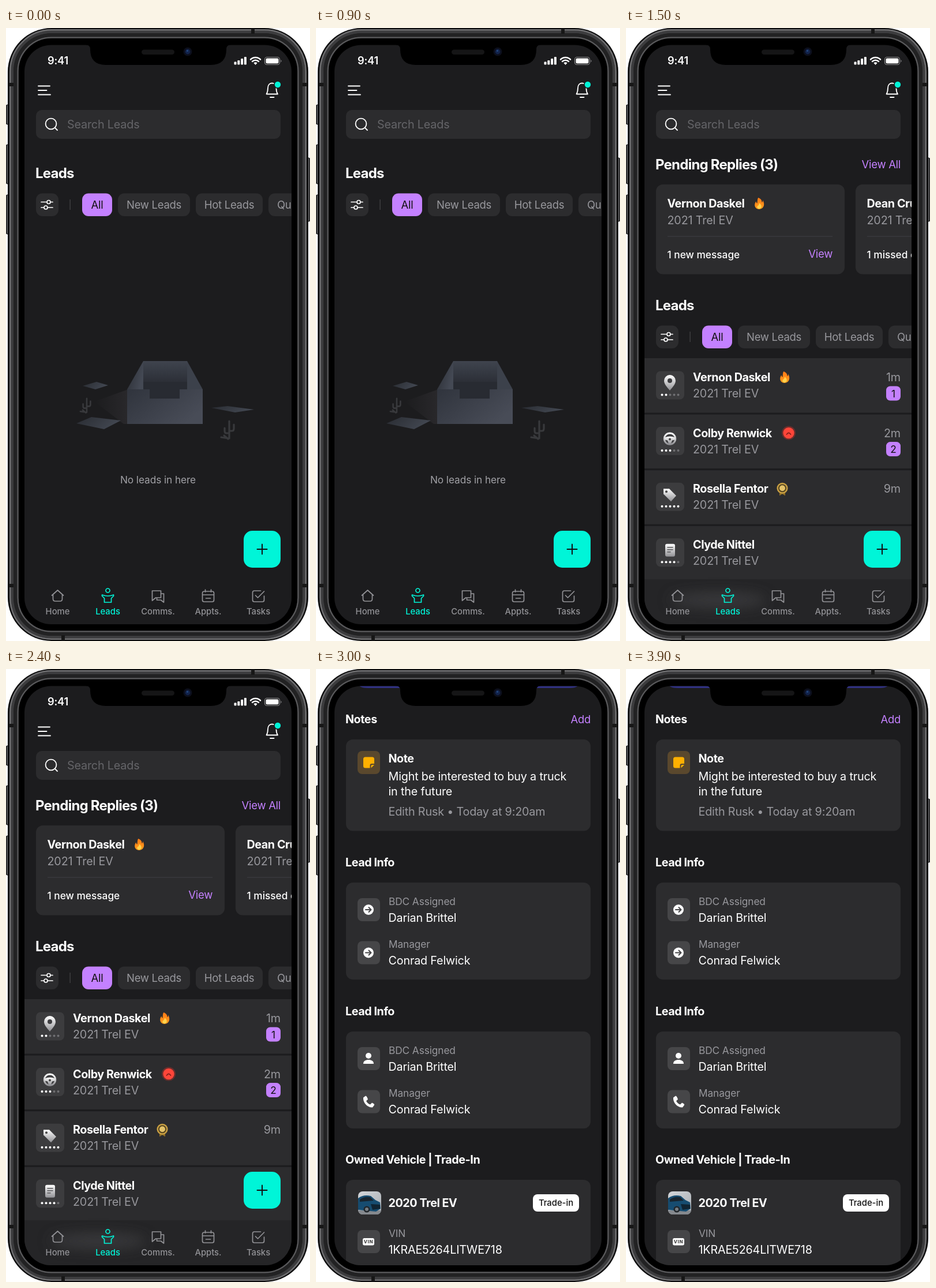
Write an HTML page that moves like this. It is 527 by 1062 pixels and loops after 4500 ms.

```html
<!DOCTYPE html>
<html lang="en">
<head>
<meta charset="utf-8">
<title>Leads app</title>
<style>
  html, body { margin: 0; width: 100%; height: 100%; overflow: hidden; background: #fff; }
  svg { display: block; width: 100%; height: 100%; }
  text { font-family: Inter, sans-serif; font-optical-sizing: none; fill: #fff; white-space: pre; }
  .body { font-size: 19.76px; letter-spacing: -.009em; }
  .bold { font-size: 19.76px; letter-spacing: -.023em; font-weight: 700; }
  .head { font-size: 24px; letter-spacing: -.032em; font-weight: 700; }
  .chip { font-size: 18.5px; letter-spacing: -.016em; }
  .small { font-size: 17.3px; letter-spacing: -.006em; }
  .status { font-size: 17.3px; font-weight: 500; }
  .clock { font-size: 18.3px; font-weight: 600; letter-spacing: -.011em; }
  .tab { font-size: 14.8px; font-weight: 500; }
  .line { fill: none; stroke-linecap: round; stroke-linejoin: round; }
</style>
</head>
<body>
<script>
const TEAL = '#00f5d8', PURPLE = '#c481ff', BG = '#1c1c1e', CARD = '#2c2c2e', BOX = '#464648', GRAY = '#98989d';
const SCENE_MS = 1500;

const rect = (x, y, w, h, r, fill, extra = '') =>
  `<rect x="${x}" y="${y}" width="${w}" height="${h}" rx="${r}" fill="${fill}" ${extra}/>`;
const circle = (x, y, r, fill, extra = '') => `<circle cx="${x}" cy="${y}" r="${r}" fill="${fill}" ${extra}/>`;
const path = (d, fill, extra = '') => `<path d="${d}" fill="${fill}" ${extra}/>`;
const line = (d, color = '#fff', width = 1.8) => `<path class="line" d="${d}" stroke="${color}" stroke-width="${width}"/>`;
const text = (x, y, kind, str, color = '#fff', anchor = 'start') =>
  `<text x="${x}" y="${y}" class="${kind}" text-anchor="${anchor}" style="fill:${color}">${str}</text>`;
const at = (x, y, content, scale = 1) => `<g transform="translate(${x} ${y}) scale(${scale})">${content}</g>`;
const gradient = (id, from, to, x2 = 0, y2 = 1) =>
  `<linearGradient id="${id}" x2="${x2}" y2="${y2}"><stop stop-color="${from}"/><stop offset="1" stop-color="${to}"/></linearGradient>`;

const defs = `<defs>
  ${gradient('front', '#30343d', '#484c57', 1, .6)}${gradient('back', '#3f444e', '#2c2f37')}
  ${gradient('side', '#2a2d34', '#444954', 1, .4)}${gradient('shade', '#1c1c1e', '#29282b', 1, 0)}
  ${gradient('paper', '#292c32', '#424751', 1, .3)}${gradient('metal', '#ffffff', '#909094')}
  ${gradient('fire', '#ff7a16', '#ff9d1c')}${gradient('photo', '#d3d6d9', '#a8adb2', 1, 1)}
  <clipPath id="screen"><rect x="32" y="29.5" width="463" height="1003.5" rx="46"/></clipPath>
  <clipPath id="thumb"><rect x="73" y="905" width="40" height="40" rx="8"/></clipPath>
  <filter id="blur" x="-50%" y="-150%" width="200%" height="400%"><feGaussianBlur stdDeviation="12"/></filter>
</defs>`;

// Phone shell
const ring = (inset, color, width) =>
  rect(4 + inset, inset, 519 - 2 * inset, 1062 - 2 * inset, 75 - inset, 'none', `stroke="${color}" stroke-width="${width}"`);
const button = (x, y, h) => rect(x, y, 6, h, 2, '#5c5c5e', 'stroke="#111" stroke-width="1.2"');
const seam = (x, y, w, h) => rect(x, y, w, h, 0, '#171717');
const shell = button(0.5, 133, 34) + button(0.5, 202, 68) + button(0.5, 289, 68) + button(520.5, 225, 110)
  + rect(3, 0, 521, 1062, 76, '#0b0b0c')
  + ring(3.5, '#6e6e70', 3) + ring(7, '#3c3c3e', 5) + ring(12, '#222223', 6) + ring(16.5, '#58585a', 2.5)
  + rect(22, 18, 483, 1026, 57, '#000')
  + seam(425, 1, 6, 9) + seam(96, 1052, 6, 9) + [95, 963].map(y => seam(4, y, 9, 6) + seam(514, y, 9, 6)).join('');
const notch = path('M138 29q8 0 8 8 0 27 27 27H355q27 0 27-27 0-8 8-8z', '#000')
  + rect(235, 37.5, 57, 8.5, 4.2, '#151516') + circle(315, 41, 7.5, '#0c0f1c')
  + circle(315, 41, 4.4, '#12234c') + circle(314.5, 39.5, 1.5, '#244a80');

// Header
const wifi = line('M424 54.5a12 12 0 0 1 17 0M427 58a8 8 0 0 1 11 0', '#fff', 2.5)
  + path('M432.5 64l-3.1-3.4a4.5 4.5 0 0 1 6.2 0z', '#fff');
const header = text(72, 63, 'clock', '9:41')
  + [5, 7.5, 10.5, 13.5].map((h, i) => rect(395.5 + 5.8 * i, 63.5 - h, 4, h, 1, '#fff')).join('')
  + wifi + rect(448.5, 50.5, 26, 13, 4, 'none', 'stroke="#8a8a8c" stroke-width="1.2"')
  + rect(450.5, 52.5, 22, 9, 2.3, '#fff') + path('M476.5 55q2.5 2 0 4.5z', '#8a8a8c')
  + line('M56 100.5H76M56 108H70.5M56 115.5H77')
  + line('M451.5 114.5H471c-2-3-2.5-5-2.5-10 0-6-3.2-9-7.3-9s-7.3 3-7.3 9c0 5-.5 7-2.4 10zM458 120h6.5')
  + circle(471, 98, 7, BG) + circle(471, 98, 5.2, TEAL)
  + rect(52, 142, 424, 50, 10, CARD) + circle(78, 166, 9.4, 'none', 'stroke="#fff" stroke-width="1.8"')
  + line('M85 173l4 4') + text(106, 173.5, 'body', 'Search Leads', '#656569');

// Filter row, placed relative to the first layout
const chip = (x, w, label, active) => rect(x, 286.5, w, 39.5, 11, active ? PURPLE : CARD)
  + text(x + w / 2, 312.5, 'chip', label, active ? '#111' : GRAY, 'middle');
const filters = text(51, 260, 'head', 'Leads') + rect(52, 286.5, 39, 39.5, 11, CARD)
  + line('M61 301.5H70M78 301.5H81M61 311H65M73 311H81', '#fff', 1.7)
  + [[74, 301.5], [69, 311]].map(([x, y]) => circle(x, y, 3, 'none', 'stroke="#fff" stroke-width="1.7"')).join('')
  + rect(110.5, 297, 1.3, 18, 0, '#424245')
  + chip(132, 52, 'All', true) + chip(194, 125, 'New Leads') + chip(329, 116, 'Hot Leads')
  + rect(455, 286.5, 110, 39.5, 11, CARD) + text(470, 312.5, 'chip', 'Qualified', GRAY);

// Bottom navigation
const tabs = [
  ['Home', 'M-10-1L0-10 10-1M-8-3V5q0 4 4 4H4q4 0 4-4V-3'],
  ['Leads', 'M-3.5-9.5a3.5 3.5 0 1 1 7 0 3.5 3.5 0 1 1-7 0M-10-2Q0 2 10-2V0L6 4V11H-6V4L-10 0z'],
  ['Comms.', 'M-10-9H5V3H-4L-10 8zM5-4H10V11L5 7H-2V3'],
  ['Appts.', 'M-7-8H7q3 0 3 3V7q0 3-3 3H-7q-3 0-3-3V-5q0-3 3-3zM-5-11V-7M5-11V-7M-10-2H10M-4 4H4'],
  ['Tasks', 'M10 0V7q0 3-3 3H-7q-3 0-3-3V-6q0-3 3-3H4M-5-1L-1 3 10-8']
];
const nav = tabs.map(([label, icon], i) => {
  const color = label === 'Leads' ? TEAL : '#929296';
  return at(89.5 + 87 * i, 984, line(icon, color, 1.7) + text(0, 32, 'tab', label, color, 'middle'));
}).join('');
const addButton = rect(412, 871, 64, 64, 15, TEAL) + line('M444 894.5V911.5M435.5 903H452.5', '#111', 2);

// Empty state
const cactus = line('M0 16V-14M-1 7H-5Q-8 7-8 3V-2M1 3H5Q8 3 8-1V-8M-1 16L-14 14M-2 17L-9 11', '#38393c', 3.2);
const emptyBox = path('M212 626L153 647 204 686H212z', 'url(#shade)')
  + path('M238 577H314V613H238z', 'url(#back)')
  + path('M238 613H314V642H238z', '#282b32')
  + path('M238 577V626H210z', 'url(#side)')
  + path('M314 577L341 626H314z', '#3c414b')
  + path('M210 626H249V642H301V626H341V686H210z', 'url(#front)')
  + ['M133 620L157 613 177 619 155 626z', 'M122 685L148 674 199 680 170 695z', 'M356 658L384 655 430 661 397 666z']
    .map(d => path(d, 'url(#paper)')).join('')
  + at(140, 653, cactus, .8) + at(387, 695, cactus);
const emptyScene = header + filters + emptyBox
  + text(263.5, 789, 'small', 'No leads in here', '#a0a0a5', 'middle') + nav + addButton;

// Lead list
const flame = at(0, 0, path('M-2-11C4-9 5-5 5-2 7-3 7-5 6-7 11 0 10 10 0 11-10 10-10 1-6-4-6-2-5-1-4 0-3-4-4-8-2-11z', 'url(#fire)')
  + path('M0-1C5 3 6 9 0 10-6 9-4 4-2 4-1 3 0 1 0-1z', '#ffd34d'), .92);
const sadFace = circle(0, 0, 12, '#6b2e2c') + circle(0, 0, 9.6, '#ff4539') + line('M-3.5 2.5Q0-3 3.5 2.5', '#7a1d18', 1.7);
const medal = path('M-5 5V12L0 9 5 12V5z', '#8d6d26') + circle(0, -1, 9.5, '#c9a043')
  + circle(0, -1, 7, '#54431f') + circle(0, -1, 5, '#e3c269');
const pin = path('M0 13C-5 7-10 2-10-4A10 10 0 0 1 10-4C10 2 5 7 0 13z', 'url(#metal)') + circle(0, -4, 4, '#3d3d40');
const wheel = circle(0, 0, 9.7, 'none', 'stroke="url(#metal)" stroke-width="3"')
  + path('M-9-2Q0-6 9-2V2L4 3 2 9H-2L-4 3-9 2z', 'url(#metal)') + circle(0, 1, 2, '#444');
const tag = path('M-11-10H-1L11 2 2 12-11-1z', 'url(#metal)') + circle(-6, -5, 2, '#444');
const sheet = rect(-8, -11, 17, 22, 3, 'url(#metal)') + line('M-4-5H5M-4-1H5M-4 3H1', '#545457', 1.6);

const vehicle = '2021 Trel EV';
const rows = [
  { name: 'Vernon Daskel', icon: pin, score: 2, mark: flame, markX: 275, age: '1m', unread: 1 },
  { name: 'Colby Renwick', icon: wheel, score: 3, mark: sadFace, markX: 282, age: '2m', unread: 2 },
  { name: 'Rosella Fentor', icon: tag, score: 5, mark: medal, markX: 271, age: '9m' },
  { name: 'Clyde Nittel', icon: sheet, score: 4 }
];
const leadRow = (row, i) => at(0, 572 + 96.6 * i,
  rect(32, i ? 1 : 0, 463, i ? 93.5 : 94.5, 0, CARD) + rect(52, 22.5, 49, 49, 8, '#3c3c3e')
  + at(76, 43, row.icon)
  + [0, 1, 2, 3, 4].map(n => circle(62.5 + 7 * n, 63.5, 2, n < row.score ? '#fff' : '#707073')).join('')
  + text(116, 40, 'bold', row.name) + text(116, 68, 'body', vehicle, GRAY)
  + (row.mark ? at(row.markX, 33, row.mark) : '')
  + (row.age ? text(476, 40, 'body', row.age, GRAY, 'end') : '')
  + (row.unread ? rect(451, 48.5, 25, 25, 7, PURPLE) + text(463.5, 67.5, 'small', row.unread, '#111', 'middle') : ''));
const replyCard = (x, name, status) => rect(x, 271, 327, 155.5, 12, CARD)
  + text(x + 19.5, 311, 'bold', name) + text(x + 19.5, 339.5, 'body', vehicle, GRAY)
  + rect(x + 20, 360.5, 286, 1.2, 0, '#3d3d40') + text(x + 19.5, 399, 'status', status);
const listScene = header
  + text(51, 245, 'head', 'Pending Replies (3)') + text(476, 243, 'chip', 'View All', PURPLE, 'end')
  + replyCard(52, 'Vernon Daskel', '1 new message') + at(231, 304, flame)
  + text(358, 398, 'chip', 'View', PURPLE, 'end') + replyCard(398, 'Dean Crull', '1 missed call')
  + at(0, 229, filters) + rows.map(leadRow).join('')
  + rect(32, 955, 463, 78, 0, '#252527')
  + `<ellipse cx="160" cy="991" rx="85" ry="12" fill="#444446" opacity=".75" filter="url(#blur)"/>` + nav + addButton;

// Lead details
const arrow = circle(0, 0, 9, '#fff') + line('M-5 0H4M.5-4L4.5 0 .5 4', '#464648', 2);
const person = circle(0, -5, 5, '#fff') + path('M-9 9C-9 4-5 2 0 2S9 4 9 9z', '#fff');
const phone = path('M-9-7L-5-10Q-3-10-1-4L-4-1Q-1 4 3 5L6 2Q11 4 10 6L7 10C-1 11-10 2-9-7z', '#fff');
const field = (y, label, value, icon) => rect(72, y, 39, 40, 8, BOX) + at(91, y + 20, icon)
  + text(126, y + 11.5, 'small', label, GRAY) + text(125.5, y + 40.5, 'body', value);
const infoCard = (y, icons) => text(51, y - 28, 'bold', 'Lead Info') + rect(52, y, 424, 168, 12, CARD)
  + field(y + 27, 'BDC Assigned', 'Darian Brittel', icons[0])
  + field(y + 101.5, 'Manager', 'Conrad Felwick', icons[1]);
const noteIcon = path('M-6-9.5H6Q9.5-9.5 9.5-6V2H5Q2 2 2 5V9.5H-6Q-9.5 9.5-9.5 6V-6Q-9.5-9.5-6-9.5z', '#ffb000')
  + path('M4 9.5V6Q4 4 6 4H9.5z', '#ffb000');
const vinIcon = rect(-10, -6, 20, 12.5, 3, '#fff')
  + `<text y="3" text-anchor="middle" style="font-size:8px;font-weight:800;letter-spacing:.08em;fill:#444">VIN</text>`;
const car = `<g clip-path="url(#thumb)">${rect(73, 905, 40, 40, 0, 'url(#photo)')}
  ${path('M73 938H113V945H73z', '#85898e')}
  ${path('M73 917Q82 910 95 913L103 920 111 924 112 935 104 940 73 937z', '#164c70')}
  ${path('M76 919Q84 913 94 915L100 921 76 923z', '#17242e')}
  ${path('M95 927L111 928V935L98 937z', '#102432')}
  ${circle(88, 936, 5.5, '#20252a')}${circle(88, 936, 3, '#747c82')}</g>`;
const detailScene = path('M75 29.5H147V33H90Q80 33 75 29.5zM382 29.5H454Q449 33 439 33H382z', '#303181')
  + text(51, 94, 'bold', 'Notes') + text(476, 94, 'chip', 'Add', PURPLE, 'end')
  + rect(52, 122, 424, 158.5, 12, CARD) + rect(72, 142, 39, 40, 8, '#5a482d') + at(91.5, 162, noteIcon)
  + text(125.5, 162, 'bold', 'Note')
  + text(125.5, 192.5, 'body', 'Might be interested to buy a truck') + text(125.5, 218.5, 'body', 'in the future')
  + text(125.5, 254, 'body', 'Edith Rusk • Today at 9:20am', GRAY)
  + infoCard(370, [arrow, arrow]) + infoCard(628, [person, phone])
  + text(51, 857, 'bold', 'Owned Vehicle | Trade-In') + rect(52, 885, 424, 180, 12, CARD) + car
  + text(125.5, 932, 'bold', '2020 Trel EV') + rect(376, 910, 80, 30, 8, '#fff')
  + text(416, 930, 'tab', 'Trade-in', '#111', 'middle')
  + field(972, 'VIN', '1KRAE5264LITWE718', vinIcon);

const scenes = [emptyScene, listScene, detailScene];
document.body.innerHTML = `<svg viewBox="0 0 527 1062">${defs}${shell}
  <g clip-path="url(#screen)">${rect(32, 29, 463, 1005, 0, BG)}
  ${scenes.map(s => `<g class="scene">${s}</g>`).join('')}</g>${notch}</svg>`;

const groups = document.querySelectorAll('.scene');
const start = performance.now();
function draw() {
  const current = Math.floor((performance.now() - start) / SCENE_MS) % groups.length;
  groups.forEach((group, i) => { group.style.display = i === current ? '' : 'none'; });
  requestAnimationFrame(draw);
}
draw();
</script>
</body>
</html>
```
